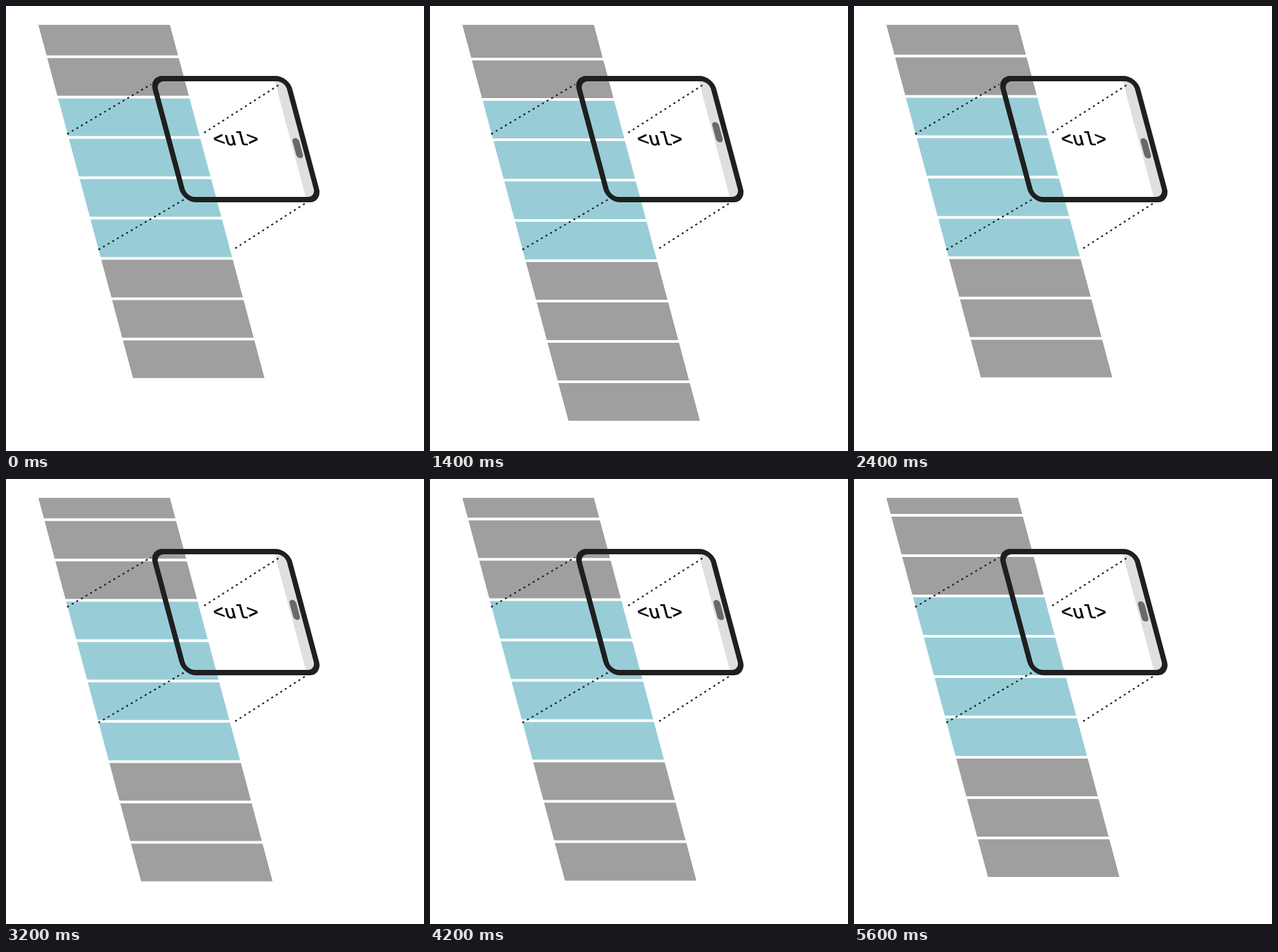
Recreate the animation shown at these times as an HTML page. Size 622x662 px, loop 5800 ms.

```html
<!DOCTYPE html>
<html lang="en">
<head>
<meta charset="utf-8">
<title>List scrolling behind a viewport</title>
<style>
  html, body { margin: 0; width: 100%; height: 100%; overflow: hidden; background: #fff; }
  svg { display: block; width: 622px; height: 662px; }
  .guides { stroke: #1f1f1f; stroke-width: 2.2; stroke-dasharray: 3 5; }
  .frame { fill: none; stroke: #1f1f1f; stroke-width: 8; }
  .track { fill: #dfdfdf; }
  .thumb { fill: #696969; }
  text { font: 28px "Liberation Mono", "Noto Sans Mono", monospace; text-anchor: middle; stroke: #000; stroke-width: .6; }
</style>
</head>
<body>
<svg viewBox="0 0 622 662">
  <clipPath id="below"><rect width="196" height="634"/></clipPath>

  <g transform="translate(48 28) skewX(15)">
    <g clip-path="url(#below)"><g id="list"></g></g>
  </g>

  <g transform="translate(217.9 108) skewX(15)">
    <path class="track" d="M181 0h3a16 16 0 0 1 16 16v148a16 16 0 0 1-16 16h-3z"/>
    <rect class="thumb" id="thumb" x="183.5" y="88.5" width="10" height="30" rx="5"/>
    <text x="100" y="99">&lt;ul&gt;</text>
  </g>

  <path class="guides" d="M91 190.5L216 116.5M295 188.5L406 117.5M137.5 362.5L269 285.5M341 360.5L450 290.5"/>

  <g transform="translate(217.9 108) skewX(15)">
    <rect class="frame" width="200" height="180" rx="16"/>
  </g>
</svg>
<script>
  const LOOP = 5800, STEP = 200, SWEEP = 1250, LEAD = 57;
  const FIRST = -2, LAST = 8, PITCH = 60;
  const GREY = [159, 159, 159], BLUE = [152, 205, 215];

  const list = document.getElementById('list');
  const thumb = document.getElementById('thumb');
  const rows = {};

  const ramp = (v, from, to) => Math.min(1, Math.max(0, (v - from) / (to - from)));
  const mix = k => `rgb(${GREY.map((c, i) => Math.round(c + (BLUE[i] - c) * k))})`;

  for (let i = FIRST; i <= LAST; i++) {
    const row = document.createElementNS('http://www.w3.org/2000/svg', 'rect');
    row.setAttribute('y', i * PITCH - 10.5);
    row.setAttribute('width', 196);
    row.setAttribute('height', 56);
    row.setAttribute('fill', mix(i >= 2 && i <= 5 ? 1 : 0));
    list.append(row);
    rows[i] = row;
  }

  // The list sweeps down and up at constant speed.
  function scrollAt(t) {
    const phase = (t + LEAD) / SWEEP % 2;
    return -3.7 + 80.4 * (1 - Math.abs(1 - phase));
  }

  function draw(now) {
    const t = Math.floor(now % LOOP / STEP) * STEP;
    const y = scrollAt(t);
    list.setAttribute('transform', `translate(0 ${y})`);
    thumb.setAttribute('transform', `translate(0 ${-0.373 * y})`);
    // One row enters the viewport at the top as another leaves at the bottom.
    rows[1].setAttribute('fill', mix(ramp(y, 49, 58)));
    rows[5].setAttribute('fill', mix(1 - ramp(y, 48, 57)));
  }

  const start = performance.now();
  function tick() {
    draw(performance.now() - start);
    requestAnimationFrame(tick);
  }
  tick();
</script>
</body>
</html>
```
